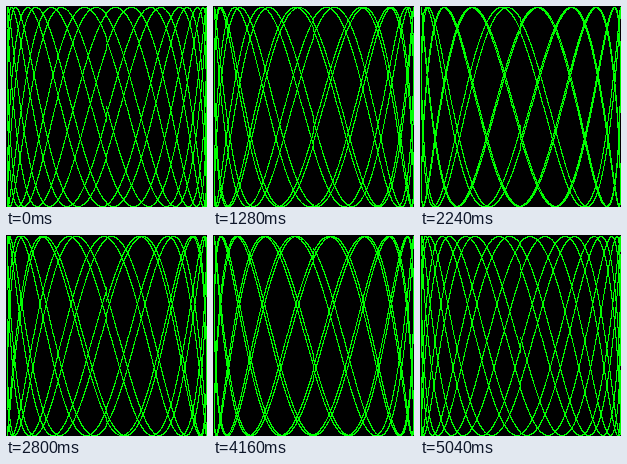
Animation, 201 px wide and 201 px high, one loop 5.12 s. Source, as an HTML page with a canvas:

```html
<!DOCTYPE html>
<html lang="en">
<head>
<meta charset="utf-8">
<title>Lissajous</title>
<style>
  html, body { margin: 0; width: 100%; height: 100%; overflow: hidden; background: #000; }
  canvas { display: block; width: 201px; height: 201px; image-rendering: pixelated; }
</style>
</head>
<body>
<canvas id="stage" width="201" height="201"></canvas>
<script>
  const RADIUS = 100;
  const SIZE = 2 * RADIUS + 1;
  const CYCLES = 5;
  const STEP = 0.001;
  const FREQUENCY = 3.605;
  const PHASE_STEP = 0.1;
  const POSES = 64;
  const POSE_MS = 80;

  const ctx = document.getElementById('stage').getContext('2d');
  const image = ctx.createImageData(SIZE, SIZE);
  const pixels = new Uint32Array(image.data.buffer);
  const BLACK = 0xff000000;
  const GREEN = 0xff00ff00;

  // Rounds by truncating toward zero, so negative values land one pixel inward.
  const toPixel = v => RADIUS + Math.trunc(v * RADIUS + 0.5);

  function draw(phase) {
    pixels.fill(BLACK);
    for (let t = 0; t < CYCLES * 2 * Math.PI; t += STEP) {
      const x = toPixel(Math.sin(t));
      const y = toPixel(Math.sin(t * FREQUENCY + phase));
      pixels[y * SIZE + x] = GREEN;
    }
    ctx.putImageData(image, 0, 0);
  }

  const start = performance.now();
  let shown = -1;

  function tick() {
    const elapsed = performance.now() - start;
    const pose = Math.floor(elapsed / POSE_MS) % POSES;
    if (pose !== shown) {
      shown = pose;
      draw(pose * PHASE_STEP);
    }
    requestAnimationFrame(tick);
  }
  tick();
</script>
</body>
</html>
```
